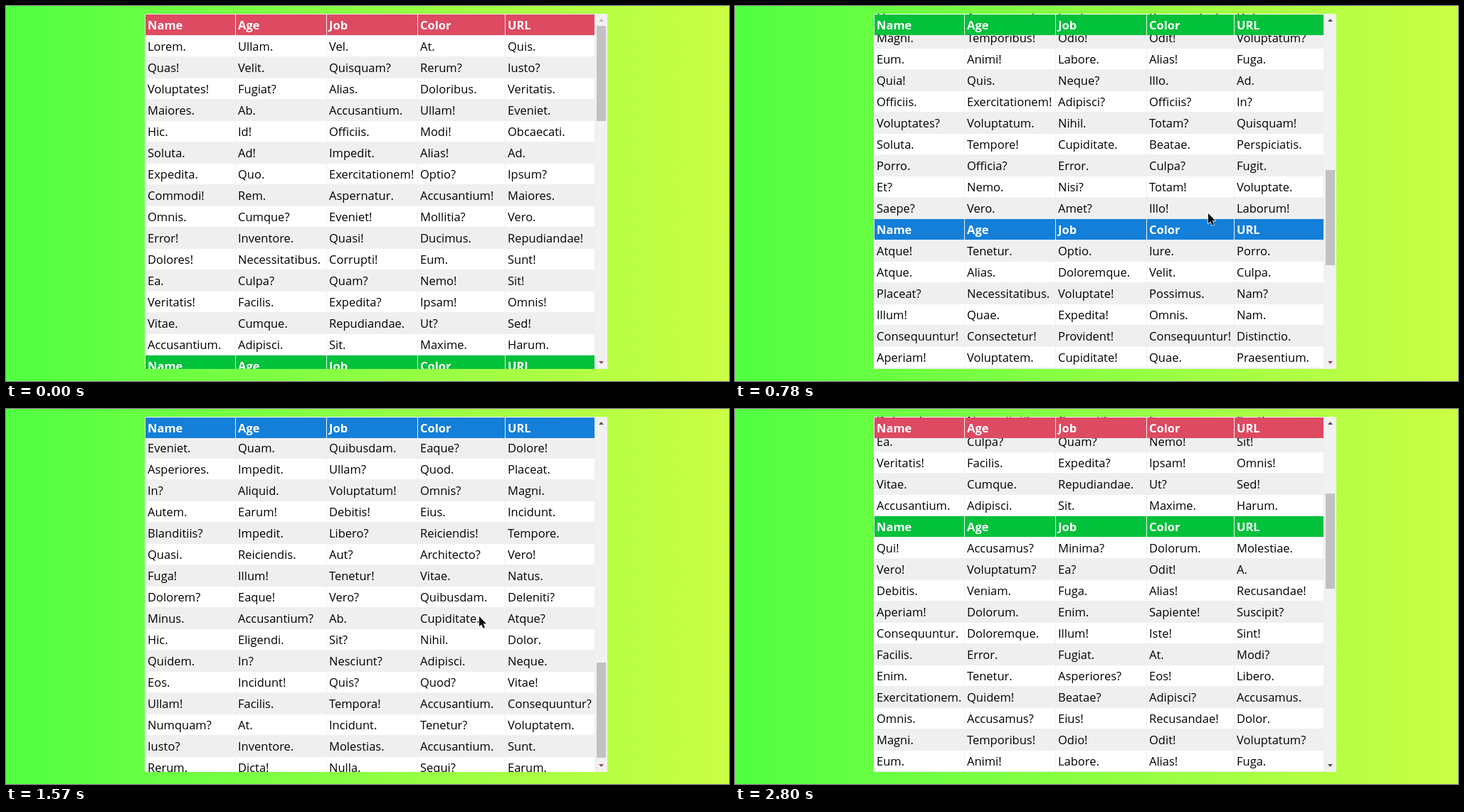
An HTML page that plays this animation: 1016 px wide and 528 px high, repeating every 3200 ms.

```html
<!DOCTYPE html>
<html lang="la">
<head>
<meta charset="utf-8">
<title>Sticky table headers</title>
<style>
  html, body { margin: 0; width: 100%; height: 100%; overflow: hidden; }
  body { position: relative; background: linear-gradient(to right, #50ff42, #cbff44); }
  #view { position: absolute; left: 195px; top: 11px; width: 633px; height: 500px; overflow: hidden; }
  #table {
    display: flex; flex-direction: column; gap: 1px; padding: 1px;
    background: #efefef; font: 16.5px/29px "Open Sans", "Noto Sans", sans-serif; color: #000;
  }
  .row {
    display: grid; flex: none; gap: 1px; height: 29px;
    grid-template-columns: 126px 127px 127px 122px 125px;
  }
  .row span { padding-left: 3px; white-space: nowrap; background: #fff; min-width: 0; }
  .row:nth-child(odd) span { background: #efefef; }
  .row.head { position: sticky; top: 1px; z-index: 1; font-weight: 700; color: #fff; }
  .row.head span { background: var(--tint); }
  #bar { position: absolute; left: 828px; top: 11px; width: 17px; height: 500px; background: #f1f1f1; }
  #bar * { position: absolute; }
  #thumb { left: 2px; width: 13px; height: 134px; background: #c1c1c1; }
  .arrow { left: 5px; width: 7px; height: 4px; }
  #up { top: 7px; clip-path: polygon(50% 0, 100% 100%, 0 100%); }
  #down { top: 489px; clip-path: polygon(0 0, 100% 0, 50% 100%); }
  svg { position: absolute; z-index: 2; left: 0; top: 0; width: 100%; height: 100%; }
</style>
</head>
<body>
<div id="view"><div id="table"></div></div>
<div id="bar"><i id="up" class="arrow"></i><i id="thumb"></i><i id="down" class="arrow"></i></div>
<svg>
  <path id="pointer" d="M0 0V14L3.2 11.2L5.6 16.8L8 15.8L5.6 10.2H10Z" stroke="#fff" stroke-width="1.4" paint-order="stroke"/>
  <path id="beam" d="M-3 -7.5H0M1 -7.5H4M.5 -7V7M-3 7.5H0M1 7.5H4" fill="none" stroke="#000"/>
</svg>
<script>
const LOOP = 3200, MAX_SCROLL = 1241;
const $ = id => document.getElementById(id);

const sections = [
  ['#dd4a62', `Lorem. Ullam. Vel. At. Quis.
Quas! Velit. Quisquam? Rerum? Iusto?
Voluptates! Fugiat? Alias. Doloribus. Veritatis.
Maiores. Ab. Accusantium. Ullam! Eveniet.
Hic. Id! Officiis. Modi! Obcaecati.
Soluta. Ad! Impedit. Alias! Ad.
Expedita. Quo. Exercitationem! Optio? Ipsum?
Commodi! Rem. Aspernatur. Accusantium! Maiores.
Omnis. Cumque? Eveniet! Mollitia? Vero.
Error! Inventore. Quasi! Ducimus. Repudiandae!
Dolores! Necessitatibus. Corrupti! Eum. Sunt!
Ea. Culpa? Quam? Nemo! Sit!
Veritatis! Facilis. Expedita? Ipsam! Omnis!
Vitae. Cumque. Repudiandae. Ut? Sed!
Accusantium. Adipisci. Sit. Maxime. Harum.`],
  ['#02c13a', `Qui! Accusamus? Minima? Dolorum. Molestiae.
Vero! Voluptatum? Ea? Odit! A.
Debitis. Veniam. Fuga. Alias! Recusandae!
Aperiam! Dolorum. Enim. Sapiente! Suscipit?
Consequuntur. Doloremque. Illum! Iste! Sint!
Facilis. Error. Fugiat. At. Modi?
Enim. Tenetur. Asperiores? Eos! Libero.
Exercitationem. Quidem! Beatae? Adipisci? Accusamus.
Omnis. Accusamus? Eius! Recusandae! Dolor.
Magni. Temporibus! Odio! Odit! Voluptatum?
Eum. Animi! Labore. Alias! Fuga.
Quia! Quis. Neque? Illo. Ad.
Officiis. Exercitationem! Adipisci? Officiis? In?
Voluptates? Voluptatum. Nihil. Totam? Quisquam!
Soluta. Tempore! Cupiditate. Beatae. Perspiciatis.
Porro. Officia? Error. Culpa? Fugit.
Et? Nemo. Nisi? Totam! Voluptate.
Saepe? Vero. Amet? Illo! Laborum!`],
  ['#147fd9', `Atque! Tenetur. Optio. Iure. Porro.
Atque. Alias. Doloremque. Velit. Culpa.
Placeat? Necessitatibus. Voluptate! Possimus. Nam?
Illum! Quae. Expedita! Omnis. Nam.
Consequuntur! Consectetur! Provident! Consequuntur! Distinctio.
Aperiam! Voluptatem. Cupiditate! Quae. Praesentium.
Eveniet. Quam. Quibusdam. Eaque? Dolore!
Asperiores. Impedit. Ullam? Quod. Placeat.
In? Aliquid. Voluptatum! Omnis? Magni.
Autem. Earum! Debitis! Eius. Incidunt.
Blanditiis? Impedit. Libero? Reiciendis! Tempore.
Quasi. Reiciendis. Aut? Architecto? Vero!
Fuga! Illum! Tenetur! Vitae. Natus.
Dolorem? Eaque! Vero? Quibusdam. Deleniti?
Minus. Accusantium? Ab. Cupiditate. Atque?
Hic. Eligendi. Sit? Nihil. Dolor.
Quidem. In? Nesciunt? Adipisci. Neque.
Eos. Incidunt! Quis? Quod? Vitae!
Ullam! Facilis. Tempora! Accusantium. Consequuntur?
Numquam? At. Incidunt. Tenetur? Voluptatem.
Iusto? Inventore. Molestias. Accusantium. Sunt.
Rerum. Dicta! Nulla. Sequi? Earum.`]
];

function addRow(line, tint) {
  const row = document.createElement('div');
  row.className = tint ? 'row head' : 'row';
  if (tint) row.style.setProperty('--tint', tint);
  for (const word of line.split(' ')) {
    row.appendChild(document.createElement('span')).textContent = word;
  }
  $('table').append(row);
}
for (const [tint, body] of sections) {
  addRow('Name Age Job Color URL', tint);
  body.split('\n').forEach(line => addRow(line));
}

// Each value holds until the next time.
const scrolls = [
  [0, 0], [390, 58], [460, 170], [550, 300], [610, 420], [690, 600], [780, 762],
  [870, 860], [930, 900], [1080, 960], [1160, 1070], [1240, 1160], [1330, 1200],
  [1490, 1214], [1560, 1232], [1640, MAX_SCROLL], [1940, 1149], [2020, 995],
  [2090, 830], [2170, 670], [2250, 518], [2330, 392], [2410, 341]
];
const cursors = [
  [0], [70, 'pointer', 898, 372], [150, 'pointer', 784, 325], [230, 'pointer', 700, 298],
  [310, 'pointer', 666, 288], [610, 'pointer', 665, 292], [1940, 'beam', 664, 293],
  [2560, 'pointer', 700, 318], [2640, 'pointer', 815, 410], [2720, 'pointer', 960, 512], [2800]
];
const at = (keys, t) => keys.findLast(key => key[0] <= t);

function draw(t) {
  const scroll = at(scrolls, t)[1];
  $('view').scrollTop = scroll;
  $('thumb').style.top = 17 + Math.floor(scroll * 332 / MAX_SCROLL) + 'px';
  $('up').style.background = scroll ? '#505050' : '#c9b0b4';
  $('down').style.background = scroll === MAX_SCROLL ? '#a3a3a3' : t < 1640 ? '#a8415a' : '#505050';

  const [, shape, x, y] = at(cursors, t);
  for (const id of ['pointer', 'beam']) {
    $(id).style.display = id === shape ? '' : 'none';
    if (id === shape) $(id).setAttribute('transform', `translate(${x} ${y})`);
  }
}

const start = performance.now();
function tick() {
  draw((performance.now() - start) % LOOP);
  requestAnimationFrame(tick);
}
tick();
</script>
</body>
</html>
```
